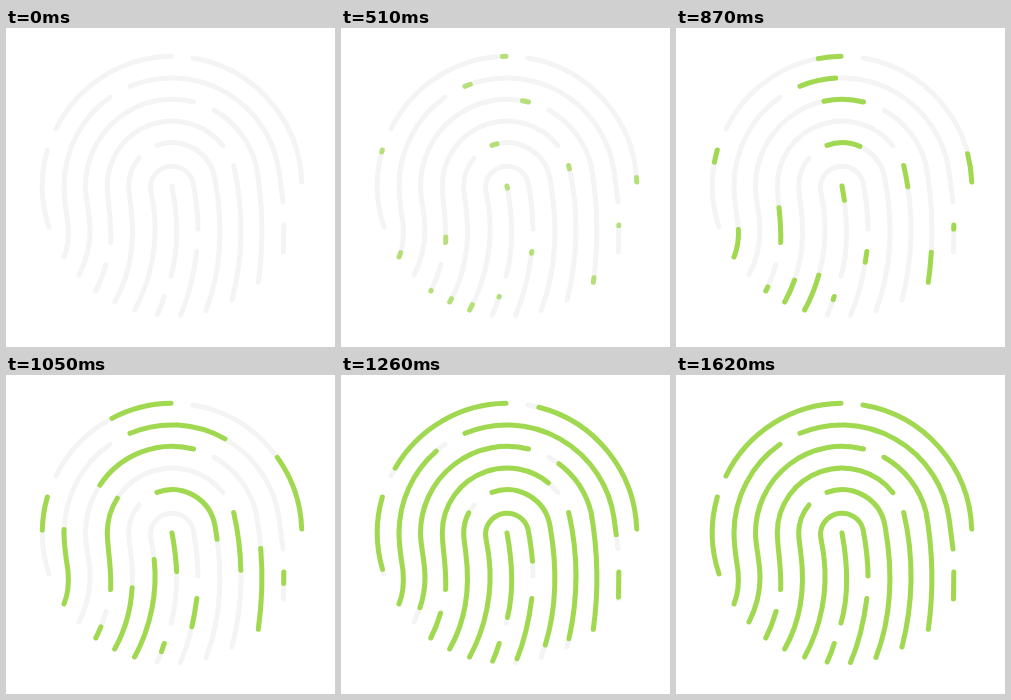
An HTML page for the animation above (2370 ms loop, 329 by 319 pixels).

```html
<!DOCTYPE html>
<html lang="en">
<head>
<meta charset="utf-8">
<title>Fingerprint scan</title>
<style>
  html, body { margin: 0; width: 100%; height: 100%; overflow: hidden; background: #fff; }
  svg { display: block; fill: none; stroke-width: 5; stroke-linecap: round; }
  #base { stroke: #f4f4f4; }
  #scan { stroke: #a0d950; }
</style>
</head>
<body>
<svg width="329" height="319" viewBox="0 0 329 319"><g id="base"></g><g id="scan"></g></svg>
<script>
const LOOP = 2370, STEP = 30;
const FADE_START = 300, FADE_TIME = 280;
const DRAW_START = 330, DRAW_TIME = 1290;

// Each ridge runs from the point where its green line begins.
const ridges = [
  'M165 28.3A130 130 0 0 0 50 101',
  'M295.7 154A130 130 0 0 0 187 30',
  'M41.3 122A130 130 0 0 0 43 199',
  'M124 58.3A108.3 108.3 0 0 1 273 143L277 174',
  'M58 229C63 217 63 207 62 196C60 182 58 172 58 158A108.3 108.3 0 0 1 104 69.3',
  'M187.5 74A86.7 86.7 0 0 0 79.5 158C79.5 172 84 185 84 203C84 220 79 235 73 247',
  'M252.3 254.3C257 221 258 182 250 137A86.7 86.7 0 0 0 208 82.3',
  'M104.7 214.5C105.5 190 101.5 175 101.3 158A64.8 64.8 0 0 1 217 117.7',
  'M151 117.3A43.5 43.5 0 0 1 209 151C216 190 217 238 200 282.5',
  'M108.7 274C125 245 129 212 125 180C124 170 122.7 165 122.7 158A43.5 43.5 0 0 1 133 130',
  'M128.6 282C145 252 152 216 148 183C147 172 144.5 165 144.5 158A21.7 21.7 0 0 1 187 154C190 170 192 185 192 201',
  'M166 158C171 185 174 217 165 248',
  'M190.8 223.5Q186 261 174.5 287.5',
  'M227.7 137.5C238 182 237 229 226 272',
  'M277.8 197L277.5 224',
  'M89.8 263Q96 251 100 236.5',
  'M158.2 268.5Q155 279 151.2 287'
];

const base = document.getElementById('base');
const scan = document.getElementById('scan');
base.innerHTML = scan.innerHTML = ridges.map(d => `<path pathLength="1" d="${d}"/>`).join('');

const clamp = x => Math.min(1, Math.max(0, x));
const bezier = (a, b, u) => 3 * u * (1 - u) ** 2 * a + 3 * u * u * (1 - u) * b + u ** 3;

function ease(x) {
  let low = 0, high = 1;
  for (let i = 0; i < 24; i++) {
    const mid = (low + high) / 2;
    if (bezier(1, 0.2, mid) < x) low = mid; else high = mid;
  }
  return bezier(0.13, 1, high);
}

function draw(now) {
  const time = Math.floor((now % LOOP) / STEP) * STEP;
  const drawn = ease(clamp((time - DRAW_START) / DRAW_TIME));
  scan.style.opacity = clamp((time - FADE_START) / FADE_TIME);
  scan.style.strokeDasharray = `${drawn.toFixed(5)} 2`;
  requestAnimationFrame(draw);
}

const start = performance.now();
(function tick() {
  draw = (body => () => body(performance.now() - start))(draw);
  draw();
})();
</script>
</body>
</html>
```
